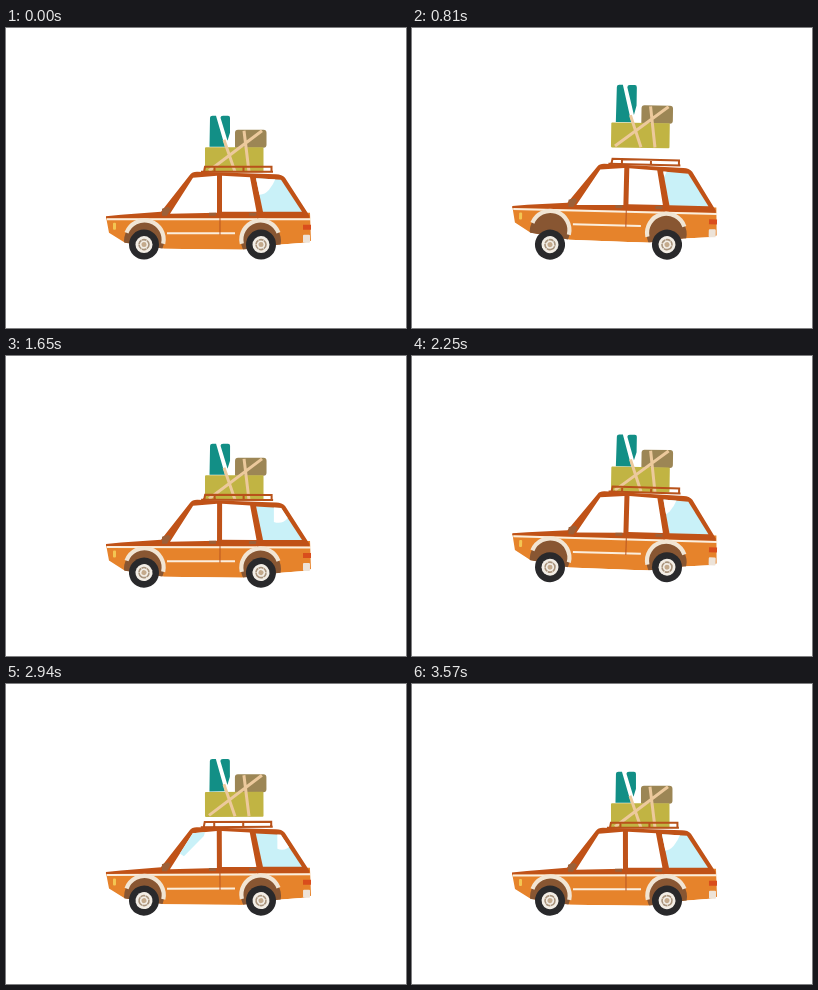
Recreate the animation shown at these times as an HTML page. Size 400 px wide and 300 px high, loop 3600 ms.

```html
<!DOCTYPE html>
<html lang="en">
<head>
<meta charset="utf-8">
<title>Loaded car</title>
<style>
  html, body { margin: 0; width: 100%; height: 100%; overflow: hidden; background: #fff; }
  svg { display: block; width: 100vw; height: 100vh; }
</style>
</head>
<body>
<svg viewBox="0 0 400 300">
  <defs>
    <clipPath id="rearPane"><path d="M250 149.500L275 151L296 183H257Z"/></clipPath>
    <clipPath id="frontPane"><path d="M187 149L211 147V184L164 185Z"/></clipPath>
    <g id="arch">
      <circle r="20" fill="#885632"/>
      <path d="M-19.200 3A19.200 19.200 0 0 1 17.500 -8" fill="none" stroke="#f1e5d4" stroke-width="4.200"/>
    </g>
    <g id="wheel">
      <circle r="15" fill="#29292b"/>
      <circle r="8.5" fill="#f3eee6"/>
      <circle r="5" fill="none" stroke="#a8937c" stroke-width="1.6" stroke-dasharray="4.7 0.53"/>
      <circle r="2.5" fill="#c4aa8c"/>
    </g>
    <clipPath id="underside"><path d="M90 120H320V213L298 214L272 216L236 221L158 220L119 214L90 206Z"/></clipPath>
  </defs>

  <g id="luggage">
    <path id="bottles" fill="#128f86" d="M204 89Q204 87 206.500 87H210L219 118H203.500ZM214.500 89Q214.500 87 217 87H222Q224 87 224 89V104L221.500 112Z"/>
    <path fill="#9c8655" d="M229 104Q229 101 232 101H257.500Q260.500 101 260.500 104V116Q260.500 119 257.500 119H229Z"/>
    <rect x="199" y="118.500" width="58.500" height="25" rx="1" fill="#c1b443"/>
    <g fill="none" stroke="#ecc99c" stroke-width="3">
      <path d="M203 142L256 102M218 111L229 143M238 102L243 143"/>
    </g>
  </g>

  <g id="body">
    <g fill="none" stroke="#b8521a" stroke-width="2">
      <path d="M198 143L199 138H265.500V143.500M208.500 138V143M237.500 138V143M195 143H267"/>
    </g>
    <g clip-path="url(#underside)">
      <path fill="#e6832b" d="M100 188L155 184H304L305 212L298 214L272 216L236 221L158 220L119 214L103 204Z"/>
      <path fill="#c05217" d="M100 187.500L115 186L155 183L184 146Q186 143 191 143L270 145.500Q276 145.500 279 149L303.500 187V189.500H100Z"/>
      <path fill="#fff" d="M187 149L211 147V184L164 185ZM216 147L244 148.500L250.500 183H216Z"/>
      <path fill="#c9f1f8" d="M250 149.500L275 151L296 183H257Z"/>
      <g clip-path="url(#rearPane)"><path id="glint" fill="#fff" d="M-9 146H13Q10 155 5 161Q-1 168 -9 165Z"/></g>
      <g clip-path="url(#frontPane)"><path id="frontGlint" fill="#c9f1f8" d="M0 145H16L14 152L-6 172L-12 168Z"/></g>
      <path fill="none" stroke="#fbeedd" stroke-width="2" d="M101 190.500H305M161 204.500H229"/>
      <path fill="none" stroke="#b95420" d="M214 146V206M250 183L252 190"/>
      <use href="#arch" transform="translate(138 212) scale(-1 1)"/>
      <use href="#arch" x="255" y="212"/>
    </g>
    <path fill="#9c6038" d="M156 180L162 178L165 180L161 187H156ZM203 184H210V187H203ZM243 184H250V187H243Z"/>
    <rect x="107" y="194" width="3" height="7" rx="1" fill="#f3c653"/>
    <rect x="297" y="196" width="8" height="5" fill="#d94d1c"/>
    <rect x="297" y="206" width="7" height="8" rx="1" fill="#ede3d8"/>
  </g>
  <g id="frontWheel"><use href="#wheel"/></g>
  <g id="rearWheel"><use href="#wheel"/></g>
</svg>
<script>
const LOOP = 3600;
const REST = 0.8;
const part = id => document.getElementById(id);
const place = (id, transform) => part(id).setAttribute("transform", transform);

// Height of a jump that starts, peaks and lands at the given times
function hop(t, start, peak, land, height) {
  if (t <= start || t >= land) return 0;
  const u = (t - peak) / (t < peak ? peak - start : land - peak);
  return height * (1 - u * u);
}

function draw(now) {
  const t = now % LOOP;
  const idle = 0.3 * Math.sin(t / LOOP * 2 * Math.PI * 9);

  const front = idle + hop(t, 540, 780, 1080, 10.5) + hop(t, 2150, 2270, 2600, 11.5) - hop(t, 2650, 2780, 2920, 3);
  const rear = -idle + hop(t, 550, 840, 1090, 5.5) + hop(t, 2170, 2300, 2640, 6) + hop(t, 2640, 2780, 2960, 7);
  const tilt = Math.atan((front - rear) / 205) * 180 / Math.PI;
  const ride = (front + rear) / 2;

  const toss = hop(t, 540, 815, 1100, 24.5) + hop(t, 2198, 2530, 3065, 28) + hop(t, 3065, 3250, 3440, 5);
  const lift = Math.max(toss, ride);
  const stretch = 1 + lift * lift / 96 / 31;

  place("body", `translate(0 ${REST - ride}) rotate(${tilt} 202 200)`);
  place("luggage", `translate(0 ${REST - lift}) rotate(${tilt * 0.6} 229 140)`);
  place("bottles", `translate(0 ${118 * (1 - stretch)}) scale(1 ${stretch})`);

  const spin = -t / LOOP * 360 * 8;
  const axle = 216.6 - hop(t, 2170, 2260, 2400, 5.5);
  place("frontWheel", `translate(138 ${axle}) rotate(${spin})`);
  place("rearWheel", `translate(255 ${axle}) rotate(${spin})`);

  const sweep = (t % 1200) / 1200;
  place("glint", `translate(${258 + 50 * sweep - (sweep > 0.5 ? 50 : 0)} 0)`);
  place("frontGlint", `translate(${150 + (t - 2600) * 0.1} 0)`);
  requestAnimationFrame(() => draw(performance.now()));
}
draw(performance.now());
</script>
</body>
</html>
```
